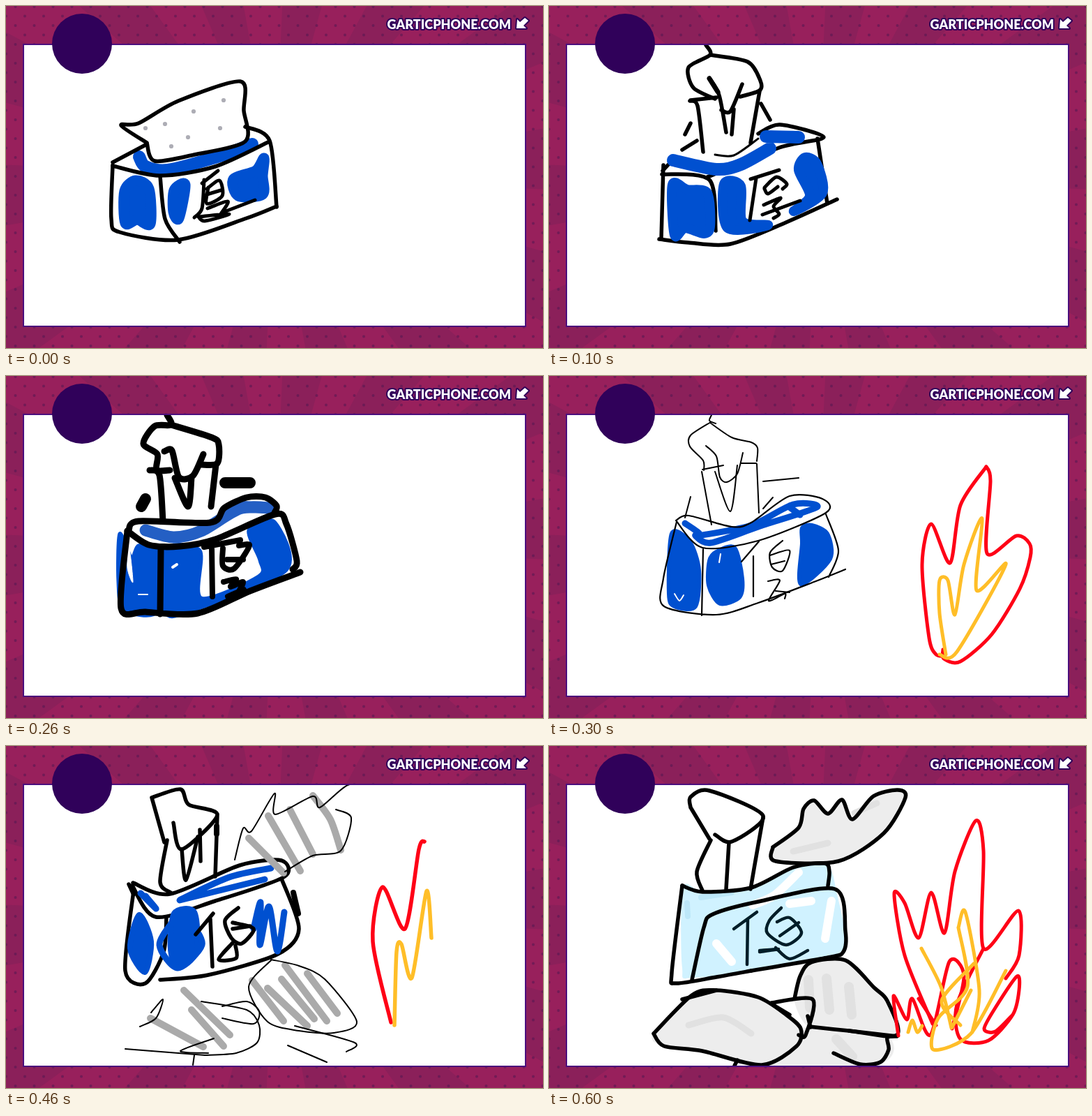
Recreate the animation shown at these times as an HTML page with a canvas. Size 770 px wide and 490 px high, loop 0.7 s.

```html
<!DOCTYPE html>
<html lang="en">
<head>
<meta charset="utf-8">
<title>Tissue box</title>
<style>
html, body { margin: 0; width: 100%; height: 100%; overflow: hidden; background: #92205b; }
canvas { display: block; }
</style>
</head>
<body>
<canvas id="stage" width="770" height="490"></canvas>
<script>
const ctx = document.getElementById('stage').getContext('2d');
const STEP = 100;
const BLACK = '#000', BLUE = '#0050d0', RED = '#ff0016', GOLD = '#ffbe28';
const GREY = '#aaaaaa', PLUM = '#30015a', WHITE = '#fff';

// "x,y x,y / x,y ..." becomes smooth strokes through the points
function trace(text, closed) {
  for (const part of text.split('/')) {
    const p = part.trim().split(/\s+/).map(s => s.split(',').map(Number));
    const n = p.length;
    const at = i => closed ? p[(i + n) % n] : p[Math.max(0, Math.min(n - 1, i))];
    ctx.moveTo(...p[0]);
    for (let i = 0; i < (closed ? n : n - 1); i++) {
      const [a, b, c, d] = [at(i - 1), at(i), at(i + 1), at(i + 2)];
      ctx.bezierCurveTo(b[0] + (c[0] - a[0]) / 7, b[1] + (c[1] - a[1]) / 7,
        c[0] - (d[0] - b[0]) / 7, c[1] - (d[1] - b[1]) / 7, c[0], c[1]);
    }
  }
}

function pen(color, width, line) {
  ctx.strokeStyle = color;
  ctx.lineWidth = width;
  ctx.beginPath();
  trace(line);
  ctx.stroke();
}

function blob(color, width, shape) {
  ctx.fillStyle = ctx.strokeStyle = color;
  ctx.lineWidth = width;
  ctx.beginPath();
  trace(shape, true);
  ctx.fill();
  ctx.stroke();
}

function dot(color, x, y, r) {
  ctx.fillStyle = color;
  ctx.beginPath();
  ctx.arc(x, y, r, 0, 7);
  ctx.fill();
}

function shifted(dx, dy, paint) {
  ctx.save();
  ctx.translate(dx, dy);
  paint();
  ctx.restore();
}

function boxWithDots() {
  pen(BLUE, 18, '191,216 200,230 232,235 310,214 353,198');
  blob(BLUE, 15, '171,311 170,265 186,250 205,262 207,312 188,306');
  blob(BLUE, 15, '257,256 241,264 240,295 248,304');
  blob(BLUE, 15, '370,218 358,236 326,248 333,272 368,270 368,243');
  pen(BLACK, 5.5, '202,196 165,171 190,168 247,136 336,108 341,150 343,194 270,213 213,222 202,196');
  pen(BLACK, 5.5, '153,224 202,198 / 153,229 220,243 300,230 378,194 / 343,173 378,193 388,288');
  pen(BLACK, 5.5, '153,228 151,305 163,324 247,335 345,304 388,287 / 221,244 228,305 249,338');
  pen(BLACK, 5, '304,236 281,254 / 284,249 281,290 270,303 / 288,262 306,250 310,272 288,283 290,260 / 288,270 308,264');
  pen(BLACK, 5, '289,290 318,280 308,298 / 276,302 320,298 285,308 276,302 / 310,296 357,278');
  for (const [x, y] of [[312, 135], [269, 151], [228, 169], [200, 175], [307, 175], [261, 188], [237, 201]])
    dot('#adadb5', x, y, 3.1);
}

function handPulls() {
  pen(BLACK, 5.5, '164,228 161,333 / 162,241 230,249 239,322 / 158,334 200,339 260,341 340,310 413,277');
  pen(BLACK, 5.5, '163,236 175,223 / 191,206 212,193 / 300,183 331,170 394,188 330,203 225,246 / 385,190 399,283');
  pen(BLUE, 18, '178,221 240,234 275,227 317,204 / 311,187 358,188');
  blob(BLUE, 14, '177,256 180,328 195,318 222,326 231,316 227,268 198,263');
  blob(BLUE, 14, '251,255 275,258 277,308 314,314 256,318');
  blob(BLUE, 14, '358,235 367,217 384,226 392,268 351,294 374,272');
  pen(BLACK, 5.5, '225,56 231,70 200,88 207,117 238,133 / 231,70 285,80 303,107 302,121 274,130');
  pen(BLACK, 5.5, '230,103 244,128 254,181 / 247,149 260,151 277,112 / 265,148 262,184');
  pen(BLACK, 5.5, '202,136 213,143 221,209 / 203,135 240,131 / 302,122 289,196 / 304,140 317,163 / 203,168 195,184');
  pen(BLACK, 7, '230,104 242,123');
  pen(BLACK, 3, '238,213 265,214 300,190');
  pen(BLACK, 5, '289,248 330,235 / 297,247 288,307 / 309,260 326,245 341,255 335,262');
  pen(BLACK, 5, '309,262 314,269 328,259 / 308,285 332,275 322,287 330,298 322,304 / 306,299 360,279');
}

function boldBox() {
  blob(BLUE, 5, '163,226 161,295 169,335 217,337 217,251 190,243 180,260');
  blob(BLUE, 5, '227,250 278,250 280,318 362,287 364,264 348,221 385,209 402,278 270,335 228,338');
  blob(WHITE, 1, '176,240 174,275 182,295');
  pen(WHITE, 2, '190,313 203,313');
  pen(WHITE, 4, '239,274 245,270');
  pen('#245fc4', 17, '200,221 240,231 280,222 335,190 378,189 326,187');
  pen(BLACK, 9, '231,56 237,70 213,72 197,97 217,112 216,134 235,135 / 237,70 295,88 305,98 303,125 280,127');
  pen(BLACK, 9, '227,108 238,107 248,145 268,143 283,112 / 206,135 220,142 225,208 / 301,127 294,187 / 242,146 261,187 266,146');
  pen(BLACK, 9, '176,221 190,208 293,210 313,189 345,174 372,174 388,186 385,196');
  pen(BLACK, 9, '174,222 205,242 250,244 300,234 386,198 402,212 417,265 411,277');
  pen(BLACK, 9, '174,222 165,333 200,338 275,340 350,308 422,281 / 222,248 221,341');
  pen(BLACK, 16, '200,176 194,187 / 314,153 350,153');
  pen(BLACK, 8, '284,245 336,235 / 295,246 296,316 / 311,247 311,272 327,276 349,243 334,243 / 317,263 340,263');
  pen(BLACK, 8, '312,295 330,291 322,302 340,295 333,310 / 318,316 341,306');
}

function thinBox() {
  blob(BLUE, 6, '176,226 172,312 180,330 210,330 215,278 202,238');
  blob(BLUE, 6, '230,265 229,300 245,326 273,317 277,290 266,246 240,252');
  blob(BLUE, 6, '363,218 377,214 399,226 403,262 361,298 363,240');
  pen(WHITE, 2, '180,312 187,322 193,314 / 246,255 244,267');
  pen(BLUE, 9, '195,211 215,225 210,229 232,239 300,216 384,188 350,184 290,214 220,228 / 345,188 360,199');
  pen(BLACK, 2, '233,56 230,64 239,68 / 232,66 203,85 202,101 221,121 222,135 / 231,67 262,88 290,95 299,103 298,122');
  pen(BLACK, 2, '220,134 250,128 / 275,125 297,125 / 225,100 240,115 245,145 255,152 270,140 278,110');
  pen(BLACK, 2, '219,137 233,213 / 298,126 301,196 / 238,137 260,194 270,128 / 203,173 195,203 / 307,151 358,146 / 307,190 321,174');
  pen(BLACK, 2.2, '182,207 200,200 262,216 290,210 345,172 392,176 397,196 300,236 220,246 182,207');
  pen(BLACK, 2.2, '183,209 164,290 165,330 240,342 300,325 380,295 425,277 / 221,248 219,343 / 397,198 415,250 401,288');
  pen(BLACK, 2.2, '276,266 301,237 / 293,258 293,316 / 335,236 317,253 320,274 335,279 345,250 317,257 / 318,270 338,265');
  pen(BLACK, 2.2, '314,294 331,293 315,322 338,312 338,319 / 325,308 345,310');
  pen(RED, 5, '565,392 566,405 590,409 635,370 675,305 690,260 689,240 670,229 628,254 633,150 627,130');
  pen(RED, 5, '627,130 590,185 575,268 548,212 535,270 545,375 555,399 567,401');
  pen(GOLD, 5, '560,399 585,395 655,270 613,307 621,204 595,270 582,342 572,293 560,293 560,340 569,399');
}

function boxFlies() {
  pen(BLACK, 5.5, '209,74 250,62 262,84 303,99 252,148 240,110 / 209,74 227,138 / 303,99 300,187 / 278,120 279,165');
  pen(BLACK, 5.5, '252,148 258,192 275,130 / 231,135 221,195 236,210 / 176,198 183,213');
  pen(BLACK, 5.5, '182,196 235,212 335,171 395,164 398,188 300,222 215,245 181,200');
  pen(BLACK, 5.5, '395,190 420,262 390,298 290,328 221,335 / 183,207 171,322 200,340 226,295 230,245');
  pen(BLACK, 8, '302,115 302,126 / 412,210 419,240');
  blob(BLUE, 8, '191,242 178,290 199,324 208,280');
  blob(BLUE, 8, '241,240 236,292 247,318 273,295 270,238');
  pen(BLUE, 9, '193,211 215,233 200,215 / 250,220 320,188 380,175 / 249,221 371,191');
  pen(BLUE, 9, '240,250 220,285 246,318 281,285 265,252');
  pen(BLUE, 9, '355,262 365,224 364,285 377,230 389,294 399,238');
  pen(BLACK, 5.5, '272,270 297,240 / 293,248 296,316 / 333,232 314,250 323,275 338,283 355,262 325,253');
  pen(BLACK, 5.5, '325,262 350,258 / 325,282 305,306 330,304 329,286');
  pen(GREY, 10, '348,132 398,182 / 376,100 422,179 / 407,91 440,155 / 440,71 465,105 480,149');
  pen(GREY, 10, '353,336 398,394 / 375,347 432,401 / 395,334 442,391 / 400,314 460,394 / 432,326 475,383');
  pen(GREY, 10, '255,350 321,414 / 207,390 283,431 / 266,378 312,430');
  pen(BLACK, 2, '328,163 340,118 352,122 385,68 386,98 440,72 450,88 490,56 528,55');
  pen(BLACK, 2, '473,91 495,103 480,150 440,157 400,180 / 171,434 285,443');
  lowerRocks();
  pen(RED, 5.5, '600,137 592,148 572,262 540,202 526,280 552,396');
  pen(GOLD, 5.5, '557,400 560,295 567,284 582,332 603,208 610,275');
}

function lowerRocks() {
  pen(BLACK, 2, '380,307 348,345 375,395 420,408 470,411 503,395 457,334 420,315 380,306');
  pen(BLACK, 2, '285,443 330,440 360,425 363,400 345,378 280,366 / 192,402 215,390 225,363 208,382');
  pen(BLACK, 2, '310,390 355,398 363,380 345,366 310,373 / 298,419 250,437 290,440 / 270,443 268,457');
  pen(BLACK, 2, '404,429 460,453 / 414,401 500,425 488,438');
}

function boxFliesOn() {
  pen(BLACK, 5.5, '213,75 240,57 260,67 304,99 254,148 231,122 / 213,75 220,138 230,122 / 304,100 293,195');
  pen(BLACK, 5.5, '256,148 257,203 / 232,122 217,185 233,208 / 276,122 278,156 / 260,185 275,148');
  pen(BLACK, 5.5, '222,248 290,228 385,198 399,172 388,165 350,175 285,204 187,199 187,221 225,240');
  pen(BLACK, 5.5, '185,222 170,300 190,338 222,300 231,243 / 395,200 413,270 405,297 362,305');
  pen(BLACK, 5.5, '209,333 260,331 350,308 / 294,250 294,322 / 276,263 297,238');
  blob(BLUE, 8, '187,225 180,295 190,333 207,280 212,232');
  pen(BLUE, 9, '190,216 220,229 270,222 351,175 / 195,222 240,232 290,222 370,180 / 298,208 335,187');
  pen(BLUE, 9, '256,253 234,295 260,322 284,268 250,258 / 240,296 270,265');
  pen(BLUE, 8, '358,236 366,284 374,229 385,295 389,231 405,235');
  pen(BLACK, 5.5, '335,232 318,247 322,278 340,286 354,268 325,245 / 328,265 350,265 / 322,290 307,305 330,305 331,290 338,309 367,297');
  pen(GREY, 9, '359,128 385,162 / 393,107 420,170 / 420,94 441,147 / 459,71 485,166');
  pen(GREY, 9, '370,345 415,406 / 388,346 437,402 / 405,318 452,384 / 441,341 474,379');
  pen(GREY, 9, '257,346 318,405 / 220,391 250,416 297,436 / 270,379 297,407');
  pen(BLACK, 2, '332,173 337,118 352,140 378,74 380,110 425,70 427,95 455,60 470,90 498,55');
  pen(BLACK, 2, '470,93 488,98 485,150 450,147 415,181 / 142,432 200,438 285,443');
  shifted(1, 1, lowerRocks);
  pen(RED, 5.5, '614,109 585,145 570,288 548,210 535,209 522,285 545,388');
  pen(GOLD, 5.5, '553,392 567,280 575,277 575,344 609,212 604,310');
}

function paleBox() {
  const wing = '321,145 358,117 365,90 380,78 400,97 420,77 435,105 465,72 500,63 511,74 480,125 415,165 325,165';
  const boulder = '352,362 360,330 376,310 425,307 466,346 485,365 499,414 430,408 373,402';
  const slab = '150,412 205,357 240,350 300,360 340,385 361,405 355,430 305,457 220,437 165,430';
  const lid = '191,200 220,209 290,203 350,174 395,168 402,180 400,200';
  const front = '205,335 222,260 235,241 300,223 410,205 425,265 422,295 400,303 290,322';
  const flank = '191,200 176,325 182,340 240,331 290,322';
  for (const s of [wing, boulder, slab, '362,420 372,404 485,418 472,455 310,457']) blob('#ededed', 2, s);
  pen('#e1e1e1', 14, '372,335 374,375 / 398,333 402,378 / 430,345 434,385 / 412,420 435,445');
  pen('#e1e1e1', 9, '438,96 470,82 / 350,151 400,139 / 200,400 250,389 290,412');
  blob('#d0f2ff', 2, '193,204 220,210 290,204 350,176 397,170 411,208 421,290 350,313 208,331 192,318');
  pen('#bce7f8', 8, '198,225 199,244 / 218,217 262,210');
  pen(WHITE, 12, '292,228 323,214 358,181 / 345,226 376,222 / 405,222 396,276 / 240,283 262,309');
  pen(BLACK, 5.5, '203,88 203,73 230,64 307,100 262,137 238,127 / 203,88 230,133 / 258,138 254,205');
  pen(BLACK, 5.5, '307,102 295,170 289,205 / 232,135 212,180 220,207 / ' + lid);
  for (const s of [front, flank, wing + ' 321,145', boulder, slab + ' 150,412']) pen(BLACK, 5.5, s);
  pen(BLACK, 5.5, '191,363 240,350 / 319,368 378,363 368,414 358,414 / 320,370 345,385 / 371,387 375,403');
  pen(BLACK, 5.5, '499,416 485,418 487,435 475,453 446,456 408,440 / 499,416 430,408 / 270,450 266,458');
  pen('#001d28', 4.5, '265,262 298,238 / 285,248 284,313 / 333,232 316,250 313,268 340,285 362,268 345,246 327,252');
  pen('#001d28', 4.5, '331,272 358,253 / 302,293 329,291 302,295 / 325,289 345,305 371,293');
  pen(RED, 5, '550,398 510,300 495,212 510,225 530,275 548,210 567,268 582,180 612,107 623,150 623,290 673,236 674,300 655,333');
  pen(RED, 5, '623,290 585,370 590,420 630,422 665,385 674,350 671,330 640,375 624,405 640,409 665,385');
  pen(RED, 5, '501,415 494,358 513,392 521,362 547,414 574,309 595,330 578,405 / 530,362 555,400');
  pen(GOLD, 5, '587,260 597,238 617,350 607,410 / 587,260 600,345 558,390 551,435 605,412 655,322');
  pen(GOLD, 5, '534,290 562,345 577,404 / 609,312 563,365 590,400 / 605,350 578,403 / 515,410 521,393 528,410 535,401');
}

const scenes = [boxWithDots, handPulls, boldBox, thinBox, boxFlies, boxFliesOn, paleBox];

function backdrop() {
  ctx.fillStyle = '#98205c';
  ctx.fillRect(0, 0, 770, 490);
  const rays = 28;
  ctx.fillStyle = '#8b205a';
  for (let i = 0; i < rays; i += 2) {
    const a = i / rays * Math.PI * 2 + .27, b = a + Math.PI * 2 / rays;
    ctx.beginPath();
    ctx.moveTo(385, 245);
    ctx.lineTo(385 + 600 * Math.cos(a), 245 + 600 * Math.sin(a));
    ctx.lineTo(385 + 600 * Math.cos(b), 245 + 600 * Math.sin(b));
    ctx.fill();
  }
  for (let j = 0; j < 38; j++)
    for (let i = 0; i < 30; i++)
      dot('rgba(82,24,82,.55)', i * 27 + (j % 2 ? 0 : 13.5), j * 13.5 + 1, 2);
}

function header() {
  dot(PLUM, 109, 54, 43);
  ctx.font = '900 18px Lato, "Open Sans", sans-serif';
  ctx.textAlign = 'right';
  ctx.textBaseline = 'alphabetic';
  ctx.strokeStyle = PLUM;
  ctx.lineWidth = 4;
  ctx.strokeText('GARTICPHONE.COM', 724, 33);
  ctx.fillStyle = WHITE;
  ctx.fillText('GARTICPHONE.COM', 724, 33);
  const arrow = new Path2D('M733 19L732 32L746 32L742 28L749 21L744 17L737 23Z');
  ctx.stroke(arrow);
  ctx.fill(arrow);
}

function draw(now) {
  const scene = scenes[Math.floor(now / STEP) % scenes.length];
  ctx.lineCap = ctx.lineJoin = 'round';
  backdrop();
  ctx.fillStyle = '#4b0f7d';
  ctx.fillRect(24, 54, 722, 406);
  ctx.fillStyle = WHITE;
  ctx.fillRect(26, 56, 718, 402);
  ctx.save();
  ctx.beginPath();
  ctx.rect(26, 56, 718, 402);
  ctx.clip();
  scene();
  ctx.restore();
  header();
}

const start = performance.now();
function tick() {
  draw(performance.now() - start);
  requestAnimationFrame(tick);
}
tick();
</script>
</body>
</html>
```
